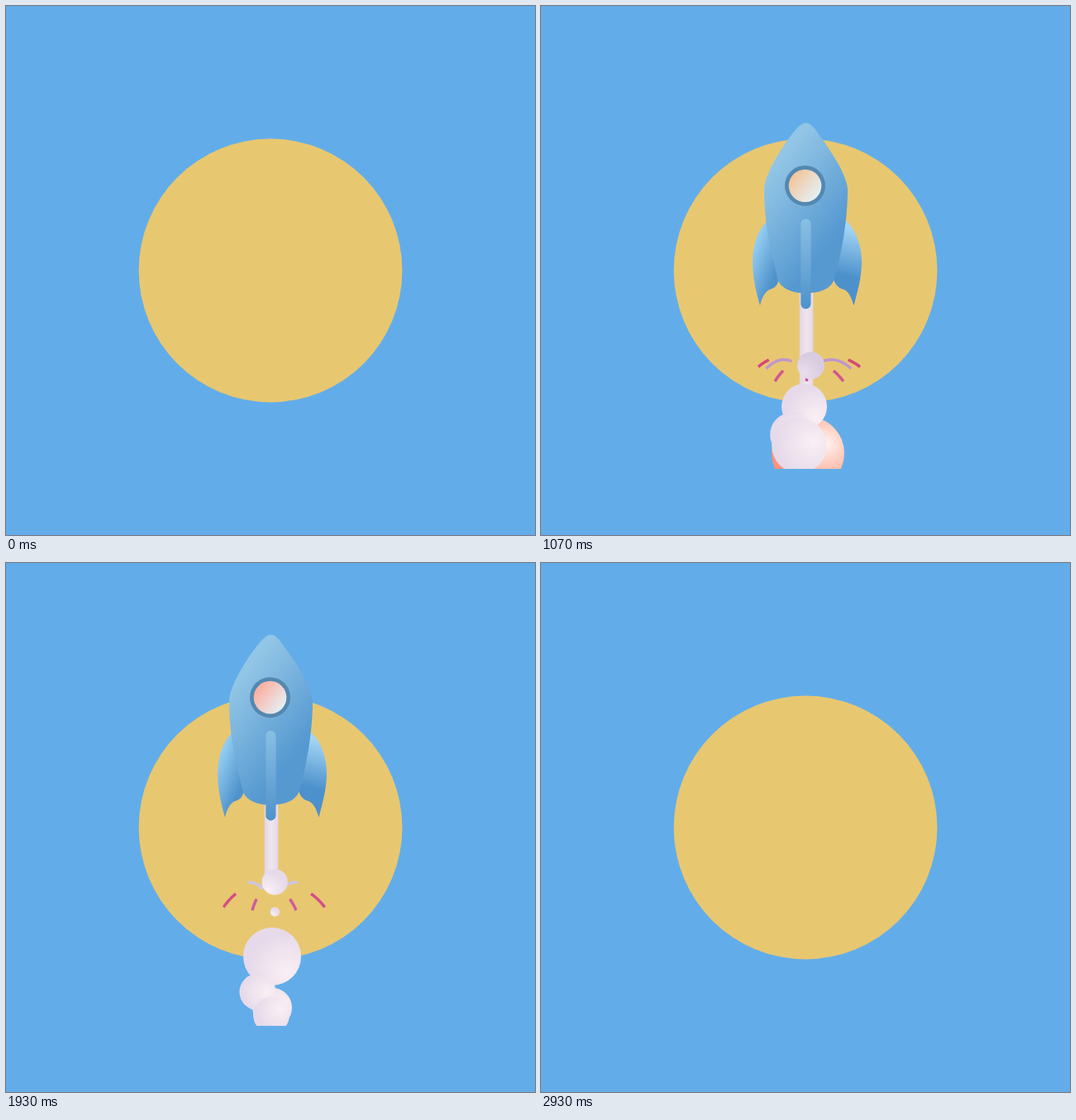
Write an HTML page with a canvas that moves like this. It is 640 px wide and 640 px high and loops after 3 s.

```html
<!DOCTYPE html>
<html lang="en">
<head>
<meta charset="utf-8">
<title>Rocket launch</title>
<style>
  html, body { margin: 0; width: 100%; height: 100%; overflow: hidden; background: #62ade9; }
  canvas { display: block; width: 100%; height: 100%; }
</style>
</head>
<body>
<canvas id="stage" width="640" height="640"></canvas>
<script>
const ctx = document.getElementById('stage').getContext('2d');
const LOOP = 3000, FRAMES = 42, STEP = LOOP / FRAMES;

const mix = (a, b, k) => a + (b - a) * k;
const clamp = (v, lo, hi) => Math.min(hi, Math.max(lo, v));
const progress = (t, from, to) => clamp((t - from) / (to - from), 0, 1);
const smooth = k => k * k * (3 - 2 * k);

function linear(x1, y1, x2, y2, ...colors) {
  const g = ctx.createLinearGradient(x1, y1, x2, y2);
  colors.forEach((c, i) => g.addColorStop(i / (colors.length - 1), c));
  return g;
}

function paint(path, fill) {
  ctx.fillStyle = fill;
  ctx.fill(path);
}

function disc(x, y, r, fill) {
  const path = new Path2D();
  path.arc(x, y, r, 0, Math.PI * 2);
  paint(path, fill);
}

// Shoot in and slow to a drift, sink a little, then accelerate away.
function rocketY(t) {
  const ENTERED = 571, PEAK = 1290, LIFT = 1660;
  const drift = time => -.065 * (time - ENTERED);
  if (t < PEAK) return drift(t) + 351 * (1 - progress(t, 0, ENTERED)) ** 2;
  if (t < LIFT) return mix(drift(PEAK), -34, smooth(progress(t, PEAK, LIFT)));
  return -34 - 125 * ((t - LIFT) / 483) ** 1.45;
}

const body = new Path2D('M320.5 174C326 174 331 180 335.500 187C351 208 371 238 371 255C371 295 362 340 354 365C350 375 336 380 320 380C304 380 291 374 287 365C280 335 270 300 270 255C270 238 288 208 304 187C310 180 315 174 320.5 174Z');
const leftFin = new Path2D('M274 292C262 304 256 322 256 342C256 360 260 378 265 395C267 386 271 377 278 375C284 373 286 370 288 363Z');
const rightFin = new Path2D('M369 292C382 304 388 324 388 342C388 360 383 378 378.5 395C375 384 372 377 365 375C359 373 356 369 354 363Z');
const spine = new Path2D();
spine.roundRect(314.3, 290, 12.2, 109, 6.1);

function drawRocket(t) {
  const warm = progress(t, 571, 1714);
  const glass = `rgb(${mix(232, 250, warm)}, ${mix(218, 178, warm)}, ${mix(158, 162, warm)})`;
  ctx.save();
  ctx.translate(0, rocketY(t));
  paint(leftFin, linear(256, 328, 290, 342, '#93cdf1', '#4f93cc'));
  paint(rightFin, linear(379, 302, 366, 358, '#a3d5f4', '#4d91cc'));
  paint(body, linear(276, 232, 362, 302, '#93c6e6', '#5699d1'));
  paint(spine, linear(0, 290, 0, 399, '#88c0e3', '#4f92cc'));
  disc(319.5, 250, 24.5, '#5488b0');
  disc(319.5, 250, 19.8, linear(306, 240, 336, 264, glass, '#e4f2fa'));
  ctx.restore();
}

function drawTrail(t) {
  const top = rocketY(t) + 370;
  const bottom = mix(560, top, smooth(progress(t, 1740, 2050)));
  if (bottom <= top) return;
  const w = mix(13, 16.5, progress(t, 571, 1071)), x = 321 - w / 2;
  ctx.fillStyle = linear(x, 0, x + w, 0, '#e2d5e4', '#f0e6ee', '#e4d7e5');
  ctx.fillRect(x, top, w, bottom - top);
}

// Sparks leave the trail in pairs, alternately wide and low.
const bursts = [
  { at: 1071, y: 435, life: 480, first: 0, last: 2 },
  { at: 1714, y: 409, life: 650, first: 0, last: 3 },
  { at: 2143, y: 386, life: 650, first: 2, last: 3 }
];

function drawSpark(p, side, pair, y) {
  if (p <= 0 || p >= 1) return;
  const low = pair % 2, wave = pair >> 1;
  const reach = (low ? 42 - 15 * wave : 62) + 3 * side;
  const drop = low ? 20 : 2 + 7 * pair, lift = low ? -4 : -20;
  const tail = p ** 3, head = 1 - (1 - p) ** 2;
  ctx.beginPath();
  for (let i = 0; i <= 12; i++) {
    const u = mix(tail, head, i / 12);
    ctx.lineTo(321.5 + side * mix(10, reach, u), y + 2 * u * (1 - u) * lift + u * u * drop);
  }
  ctx.strokeStyle = `hsl(${250 + 110 * p * p}, ${30 + 50 * p ** 4}%, ${92 - 40 * p}%)`;
  ctx.stroke();
}

function drawSparks(t) {
  ctx.lineWidth = 3.5;
  for (const { at, y, life, first, last } of bursts) {
    for (let pair = first; pair <= last; pair++) {
      const age = .9 - .04 * (pair % 2) - .35 * (pair >> 1);
      const sides = pair === 1 ? [-1, 0, 1] : [-1, 1];
      for (const side of sides) {
        drawSpark(age + (t - at) / life, side, pair, y - .035 * (t - at));
      }
    }
  }
}

const tints = {
  white: ['#faeff4', '#e6daea'],
  lilac: ['#e9deec', '#d9cce1'],
  pink: ['#fdeeee', '#f8b6ae'],
  peach: ['#fff3ef', '#ff9377']
};

// A puff swells and shrinks around its peak; its light lies towards the launch pad.
function drawPuff(t, peak, span, x, y, size, tint, lightX) {
  const r = size * (1 - ((t - peak) / span) ** 4);
  if (r < .2) return;
  const fx = x + lightX * r, fy = y + clamp((520 - y) / 80, -.4, .6) * r;
  const glow = ctx.createRadialGradient(fx, fy, 0, fx, fy, r * 1.35);
  tints[tint].forEach((c, i) => glow.addColorStop(i, c));
  disc(x, y, r, glow);
}

// Peak time, x, y, size
const groundPuffs = [
  [1071, 323, 541, 44, 'peach'],
  [1071, 318.5, 484.5, 27.5, 'white'],
  [1250, 304, 518.5, 28, 'white'],
  [820, 312.5, 532, 39.5, 'white'],
  [1600, 322, 538, 44, 'white'],
  [1920, 322, 476, 35, 'white'],
  [2200, 304.5, 519, 28, 'white'],
  [2030, 321, 547, 22, 'white'],
  [2460, 322.5, 511, 20, 'white']
];

function drawSmoke(t) {
  for (const [peak, x, y, size, tint] of groundPuffs) drawPuff(t, peak, 400, x, y, size, tint, .5);
  drawPuff(t, 1071, 250, 326.5, 435, 16.5, 'lilac', -.5);
  for (const y of [490, 521]) drawPuff(t, 2640, 250, 322.5, y, 4, 'white', 0);

  // The wake: biggest in the middle, later and further apart with height.
  for (let n = 0; n < 5; n++) {
    const x = 323 + 5 * Math.sin(2.2 * n + .5), y = 422 - 30.5 * n - 5.5 * n * n;
    const size = 8 + 32 * Math.max(0, Math.sin(n * Math.PI / 4)) ** 1.5;
    const tint = n === 2 ? 'pink' : n > 2 ? 'lilac' : 'white';
    drawPuff(t, 2110 + 20 * n * n, 250, x, y, size, tint, -.5);
  }
}

function draw(now) {
  const t = Math.floor((now % LOOP + 5) / STEP) % FRAMES * STEP;
  ctx.fillStyle = '#62ade9';
  ctx.fillRect(0, 0, 640, 640);
  disc(320, 320, 159.4, '#e8c771');
  ctx.save();
  ctx.beginPath();
  ctx.rect(80, 80, 480, 480);
  ctx.clip();
  drawTrail(t);
  drawSparks(t);
  drawSmoke(t);
  drawRocket(t);
  ctx.restore();
}

function tick() {
  draw(performance.now());
  requestAnimationFrame(tick);
}
tick();
</script>
</body>
</html>
```
